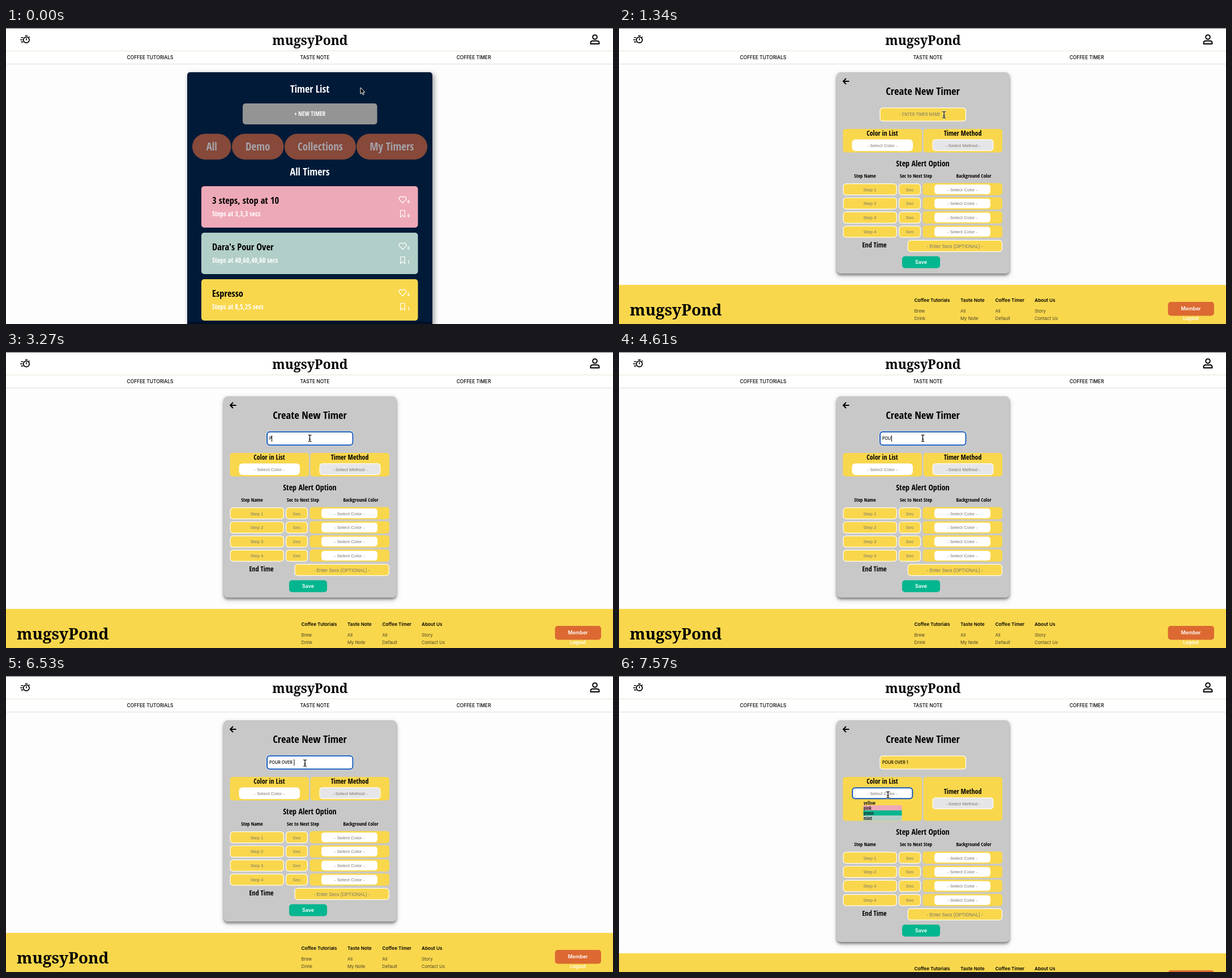
Write an HTML page that moves like this. It is 1072 px wide and 522 px high and loops after 8 s.

```html
<!DOCTYPE html>
<html lang="en">
<head>
<meta charset="utf-8">
<title>Coffee timer</title>
<style>
html, body { margin: 0; width: 100%; height: 100%; overflow: hidden; background: #fdfdfd; }
svg { display: block; width: 1072px; height: 522px; }
text { white-space: pre; }
.cond { font-family: "Open Sans Condensed", "Open Sans", sans-serif; font-stretch: 75%; font-weight: 700; }
.thin { font-family: "Open Sans Condensed", "Open Sans", sans-serif; font-stretch: 75%; font-weight: 400; }
.geo { font-family: Inter, sans-serif; font-weight: 500; }
.geo.bold { font-weight: 600; }
.geo.light { font-weight: 400; }
.arial { font-family: "Liberation Sans", Arial, sans-serif; }
.brand { font-family: "Noto Serif", serif; font-weight: 900; }
.mid { text-anchor: middle; }
</style>
</head>
<body>
<svg id="stage" viewBox="0 0 1072 522"></svg>
<script>
const NAVY = '#001a38', YELLOW = '#f9d74d', PINK = '#eea9b8', MINT = '#b2cec8',
  GREEN = '#04b68f', ORANGE = '#dc6932', GREY = '#78756c', BLUE = '#1557b7';
const LOOP = 8000, OPEN_SHIFT = 36;
const T = { form: 1340, focus: 2220, menu: 7570 };

const rect = (x, y, x2, y2, r, fill, extra = '') =>
  `<rect x="${x}" y="${y}" width="${x2 - x}" height="${y2 - y}" rx="${r}" fill="${fill}" ${extra}/>`;
const text = (cls, size, x, y, str, fill = '#000', extra = '') =>
  `<text class="${cls}" font-size="${size}" x="${x}" y="${y}" fill="${fill}" ${extra}>${str}</text>`;
const path = (d, stroke, width, fill = 'none') =>
  `<path d="${d}" stroke="${stroke}" stroke-width="${width}" fill="${fill}" stroke-linejoin="round"/>`;
const group = (id, body, extra = '') => `<g id="${id}" ${extra}>${body}</g>`;
const field = (x, y, x2, y2, fill = YELLOW) =>
  rect(x + .6, y + .6, x2 - .6, y2 - .6, 5, fill, 'stroke="#fffdf2" stroke-width="1.2"');

function header() {
  return rect(0, 0, 1072, 64, 0, '#fff') + rect(0, 0, 1072, 1, 0, '#666') +
    rect(0, 40, 1072, 41, 0, '#e6e3d2') + rect(0, 63, 1072, 64, 0, '#dcdcdc') +
    '<circle cx="36" cy="21" r="5.2" fill="none" stroke="#000" stroke-width="1.7"/>' +
    path('M33.8 13.5h4.4M36 18v3.6M40.3 16.6l1.2-1.2M26.5 17h4M25 20.8h4.5M26.5 24.6h4', '#000', 1.6) +
    '<circle cx="1040" cy="16" r="3.8" fill="none" stroke="#000" stroke-width="2"/>' +
    path('M1032.5 28v-1.6q0-3.6 3.6-3.6h7.8q3.6 0 3.6 3.6v1.6z', '#000', 2) +
    text('brand mid', 22.8, 537, 30, 'mugsyPond') +
    text('geo mid', 8.4, 254.5, 54.8, 'COFFEE TUTORIALS') +
    text('geo mid', 8.4, 545.5, 54.8, 'TASTE NOTE') +
    text('geo mid', 8.4, 826, 54.8, 'COFFEE TIMER');
}

function timerCard(i, fill, name, steps, saves) {
  const heart = 'M700.5 308.5l-5.3-5.4c-3-3.4 2-8.6 5.3-4.4c3.3-4.2 8.3 1 5.3 4.4z';
  return `<g transform="translate(0 ${i * 82})">` +
    rect(345, 279, 727.5, 352, 5, fill) +
    text('cond', 16.5, 364, 310, name) +
    text('cond', 12, 364, 332, `Steps at ${steps} secs`, '#fff') +
    path(heart, '#fff', 1.3) + path('M696.7 321.5h7.6v12l-3.8-3.4l-3.8 3.4z', '#fff', 1.2) +
    text('thin', 8, 709, 309, 0, '#fff') + text('thin', 8, 709, 334, saves, '#fff') + '</g>';
}

function list() {
  const pills = [[329, 397.5, 'All'], [399, 490.5, 'Demo'], [492, 618, 'Collections'], [619, 744, 'My Timers']];
  return rect(320, 78, 753, 560, 5, NAVY, 'style="filter:drop-shadow(3px 3px 5px #0006)"') +
    text('cond mid', 18, 536.5, 114, 'Timer List', '#fff') +
    rect(418, 133, 655.5, 170, 5, '#949494') +
    group('hover', rect(419.5, 134.5, 654, 168.5, 4, 'none', 'stroke="#dc6027" stroke-width="3"')) +
    text('cond mid', 10.5, 536.5, 155, '+ NEW TIMER', '#fff') +
    pills.map(([a, b, s]) => rect(a, 186.5, b, 232, 22.7, '#86493a') +
      text('cond mid', 19, (a + b) / 2, 216, s, '#a5a2a9')).join('') +
    text('cond mid', 18, 536.5, 259.5, 'All Timers', '#fff') +
    timerCard(0, PINK, '3 steps, stop at 10', '3,3,3', 0) +
    timerCard(1, MINT, "Dara's Pour Over", '40,60,40,60', 1) +
    timerCard(2, YELLOW, 'Espresso', '8,5,25', 1) +
    rect(320, 518, 753, 522, 0, '#001028');
}

function stepRow(i) {
  const y = 274 + i * 24.9;
  return field(395.5, y, 491, y + 21) + field(494, y, 533, y + 21) +
    rect(536.5, y - .5, 677, y + 21, 5, YELLOW) + rect(557, y + 2, 656, y + 19, 5, '#fff') +
    text('arial mid', 8, 443, y + 13.5, `Step ${i + 1}`, GREY) +
    text('arial mid', 8, 513.5, y + 13.5, 'Sec', GREY) +
    text('arial mid', 8, 606.5, y + 13.5, '- Select Color -', GREY);
}

function footer() {
  const cols = [[521.5, 'Coffee Tutorials', 'Brew', 'Drink'], [603, 'Taste Note', 'All', 'My Note'],
    [664.5, 'Coffee Timer', 'All', 'Default'], [734, 'About Us', 'Story', 'Contact Us']];
  return rect(0, 453, 1072, 560, 0, YELLOW) +
    text('brand', 27.8, 19, 507, 'mugsyPond') +
    cols.map(([x, head, a, b]) => text('geo bold', 8.2, x, 483, head) +
      text('geo light', 7.8, x, 502, a, '#4b4425') + text('geo light', 7.8, x, 515, b, '#4b4425')).join('') +
    rect(969.5, 483, 1051, 507.5, 5, ORANGE) +
    text('geo bold mid', 8.7, 1010, 498.2, 'Member', '#fff') +
    text('geo bold mid', 8.2, 1010, 515, 'Logout', '#fff');
}

function form() {
  const lower = text('cond mid', 14, 536.5, 244, 'Step Alert Option') +
    text('cond mid', 9, 434.5, 264, 'Step Name') +
    text('cond mid', 9, 524.5, 264, 'Sec to Next Step') +
    text('cond mid', 9, 626.5, 264, 'Background Color') +
    [0, 1, 2, 3].map(stepRow).join('') +
    text('cond mid', 12, 451, 387, 'End Time') +
    field(509.5, 373.8, 677, 395) +
    text('arial mid', 8.2, 593, 387.5, '- Enter Secs (OPTIONAL) -', GREY) +
    rect(500, 402.5, 567, 423.5, 5, GREEN) +
    text('geo bold mid', 8.8, 533.5, 415.7, 'Save', '#fff') + footer();
  const items = [['yellow', YELLOW], ['pink', PINK], ['green', GREEN], ['mint', MINT]];
  const menu = items.map(([s, c], i) => rect(431.5, 219 + i * 9, 499.5, 228 + i * 9, 0, c) +
    text('thin', 8, 432, 226.5 + i * 9, s, '#222')).join('');
  const shadow = 'style="filter:drop-shadow(0 3px 2px #0006) drop-shadow(0 3px 4px #0003)"';
  return rect(384.5, 78, 689.5, 433, 7, '#c8c8c8', 'id="card" ' + shadow) +
    path('M406.5 94H396M401 89l-5 5l5 5', '#000', 2) +
    text('cond mid', 18.5, 536.5, 118, 'Create New Timer') +
    group('ring', rect(459.5, 139.3, 614, 165.7, 6, '#fff')) +
    rect(461, 140.8, 612.5, 164.2, 5, YELLOW, 'id="name"') +
    group('hint', text('geo light', 6.9, 500, 155, 'ENTER TIMER NAME', GREY) +
      text('geo light', 6.9, 494, 155, '-', GREY) + text('geo light', 6.9, 575, 155, '-', GREY)) +
    text('geo', 7.1, 465, 155, '', '#000', 'id="typed"') +
    rect(0, 147, 1, 158, 0, '#000', 'id="caret"') +
    rect(395.5, 178, 535, 219.5, 5, YELLOW, 'id="panelA"') +
    rect(537.5, 178, 677, 219.5, 5, YELLOW, 'id="panelB"') +
    text('cond mid', 12, 465, 190, 'Color in List') +
    rect(411.5, 196.5, 519, 217, 6, '#fff') +
    group('selected', rect(412.2, 197.2, 518.3, 216.3, 5, '#fff', `stroke="${BLUE}" stroke-width="2"`)) +
    text('arial mid', 8.1, 465, 209.5, '- Select Color -', GREY) +
    group('method', text('cond mid', 12, 607, 190, 'Timer Method') +
      field(553.5, 196.2, 661.5, 217, '#e6e6e8') +
      text('arial mid', 8.1, 607.5, 209.5, '- Select Method -', GREY)) +
    group('menu', menu) + group('lower', lower);
}

const cursors =
  group('arrow', path('M0 0v11.2l2.5-2.3l1.9 4l1.8-.8l-1.9-3.9h3.5z', '#fff', 1, '#000')) +
  group('hand', path('M-1.2 .8q1.2-1.6 2.4 0v3.8q1.4-.8 2 .4q1.4-.5 1.9.5q1.8-.3 1.8 1.3q.2 3-1.3 5.7h-5.4' +
    'q-1.2-2.4-4-4.7q-.7-1.7 1.1-1.5l1.5 1.3z', '#000', 1, '#fff') +
    path('M1.8 8.2v2.4M3.5 8.2v2.4', '#000', .7)) +
  group('beam', ['#fff', '#000'].map((c, i) =>
    path('M-2.8-5.7Q0-5.7 0-4.2Q0-5.7 2.8-5.7M0-4.5V4.5M-2.8 5.7Q0 5.7 0 4.2Q0 5.7 2.8 5.7M-1.5 1.7H1.5',
      c, i ? 1.2 : 2.4)).join(''));

document.getElementById('stage').innerHTML = rect(0, 0, 1072, 522, 0, '#fdfdfd') +
  group('list', list()) + group('form', form()) + header() + group('cursor', cursors);

const el = id => document.getElementById(id);
const set = (id, attrs) => { for (const k in attrs) el(id).setAttribute(k, attrs[k]); };
const show = (id, on) => set(id, { display: on ? 'inline' : 'none' });

// time, typed letters, caret x (0 while blinked off)
const PHRASE = 'POUR OVER 1';
const typing = [[0, 0, 0], [2220, 0, 466], [2670, 0, 0], [3270, 1, 469], [3860, 1, 0], [4160, 2, 475],
  [4610, 3, 481], [4910, 4, 485.5], [5050, 5, 487], [5350, 6, 494], [5500, 7, 498], [5640, 8, 502],
  [5940, 9, 507], [6080, 10, 508.5], [6680, 11, 511.5], [T.menu, 11, 0]];

// first step, last step, number of steps, end point
const moves = [[440, 890, 4, 574, 153], [1490, 1930, 4, 536.5, 152],
  [6530, 6530, 1, 528, 153.5], [6830, 7420, 5, 475, 209.5]];

function pointer(t) {
  let x = 626, y = 105;
  for (const [a, b, n, x2, y2] of moves) {
    if (t < a) break;
    const k = n > 1 ? Math.min(n, Math.floor((t - a + 1) / (b - a) * (n - 1)) + 1) / n : 1;
    const p = k * k * (3 - 2 * k);
    x += (x2 - x) * p;
    y += (y2 - y) * p;
  }
  return [x, y];
}

function render(t) {
  const onForm = t >= T.form, open = t >= T.menu, focus = t >= T.focus && !open;
  const [x, y] = pointer(t), shift = open ? OPEN_SHIFT : 0;
  const overField = onForm && (y < 165 || y > 197), overButton = !onForm && y >= 133;
  show('list', !onForm);
  show('form', onForm);
  show('hover', overButton);
  show('beam', overField);
  show('hand', overButton);
  show('arrow', !overField && !overButton);
  set('cursor', { transform: `translate(${x} ${y})` });

  const [, count, caret] = typing.findLast(s => t >= s[0]);
  el('typed').textContent = PHRASE.slice(0, count);
  show('hint', !count);
  show('caret', caret);
  set('caret', { x: caret });
  show('ring', focus);
  set('name', { fill: focus ? '#fff' : YELLOW, stroke: focus ? BLUE : '#fffdf2', 'stroke-width': focus ? 2 : 1.3 });

  show('menu', open);
  show('selected', open);
  set('card', { height: 355 + shift });
  set('panelA', { height: 41.5 + shift });
  set('panelB', { height: 41.5 + shift });
  set('method', { transform: `translate(0 ${shift / 2})` });
  set('lower', { transform: `translate(0 ${shift})` });
}

const start = performance.now();
function tick() {
  render((performance.now() - start) % LOOP);
  requestAnimationFrame(tick);
}
tick();
</script>
</body>
</html>
```
